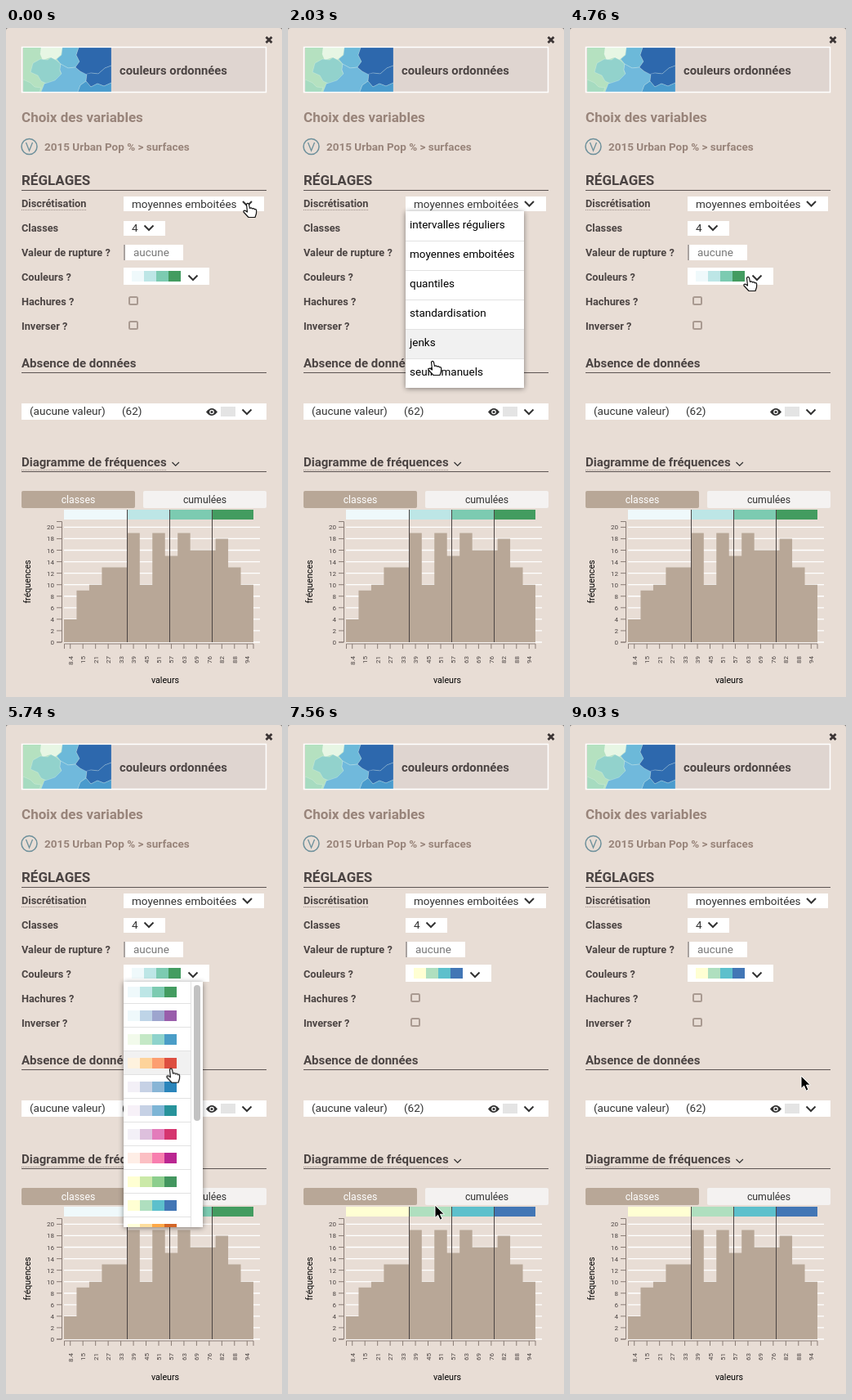
An HTML page for the animation above (9100 ms loop, 338 by 818 pixels).

```html
<!DOCTYPE html>
<html lang="fr">
<head>
<meta charset="utf-8">
<title>Couleurs ordonnées</title>
<style>
html, body { margin: 0; width: 100%; height: 100%; overflow: hidden; background: #e8ddd5; }
svg { display: block; width: 338px; height: 818px; font: 13.5px Roboto, sans-serif; fill: #333; }
.label { font-size: 12.75px; font-weight: 700; fill: #4b4443; }
.h1 { font-size: 17px; font-weight: 700; fill: #4b4443; }
.h2 { font-size: 15px; font-weight: 700; fill: #4b4443; }
.muted { font-weight: 700; fill: #98847a; }
.rule { stroke: #5c5352; }
.dots { stroke: #9b8e88; stroke-dasharray: 1 1; }
.box { fill: #fff; }
.chev { fill: none; stroke: #333; stroke-width: 2; }
.check { fill: none; stroke: #a99a91; stroke-width: 2; }
.tab { font-size: 12.3px; text-anchor: middle; }
.tick { font-size: 8px; fill: #4b4443; text-anchor: end; }
.axis { fill: none; stroke: #8a7d76; }
.title { font-size: 10.7px; fill: #000; text-anchor: middle; }
.menu { filter: drop-shadow(0 1px 3px rgba(0,0,0,.45)); }
.menu text { fill: #000; }
.sep { stroke: #e2e2e2; }
.hover { fill: #f1f1f1; }

.after, .menu, .hover, #hand, #arrow, #cursor { animation: 9100ms step-end infinite; }
.after { opacity: 0; animation-name: recolor; }
#methods { animation-name: methods; }
#palettes { animation-name: palettes; }
#methodHover { animation-name: methodHover; }
#paletteHover { animation-name: paletteHover; }
#hand { animation-name: hand; }
#arrow { animation-name: arrow; }
#cursor { animation-name: travel; animation-timing-function: ease-in-out; }

@keyframes recolor { 0% { opacity: 0 } 76.9%, 100% { opacity: 1 } }
@keyframes methods { 0% { opacity: 0 } 4.6% { opacity: 1 } 38.4%, 100% { opacity: 0 } }
@keyframes palettes { 0% { opacity: 0 } 54.6% { opacity: 1 } 76.9%, 100% { opacity: 0 } }
@keyframes hand { 0% { opacity: 1 } 41.5% { opacity: 0 } 50% { opacity: 1 } 76.9%, 100% { opacity: 0 } }
@keyframes arrow { 0% { opacity: 0 } 41.5% { opacity: 1 } 50% { opacity: 0 } 76.9%, 100% { opacity: 1 } }
@keyframes methodHover {
  0% { opacity: 0; transform: translateY(0) }
  7.25% { opacity: 1; transform: translateY(0); animation-timing-function: steps(5) }
  22.8% { opacity: 1; transform: translateY(180px) }
  27.3% { opacity: 1; transform: translateY(144px); animation-timing-function: steps(5) }
  35.9%, 100% { opacity: 0; transform: translateY(-36px) }
}
@keyframes paletteHover {
  0% { opacity: 0; transform: translateY(0) }
  55.92% { opacity: 1; transform: translateY(0); animation-timing-function: steps(9) }
  73.3%, 100% { opacity: 1; transform: translateY(261px) }
}
@keyframes travel {
  0%, 3.85% { transform: translate(296px, 214px) }
  7.7% { transform: translate(240px, 232px); animation-timing-function: linear }
  22.308% { transform: translate(177px, 407px) }
  26.9% { transform: translate(178px, 412px); animation-timing-function: linear }
  36.154%, 40% { transform: translate(288px, 221px) }
  52.308%, 55.4% { transform: translate(218px, 304px); animation-timing-function: linear }
  73.077% { transform: translate(181px, 570px) }
  75.4%, 83.08% { transform: translate(180px, 587px) }
  97.7%, 100% { transform: translate(283px, 429px) }
}
</style>
</head>
<body>
<svg viewBox="0 0 338 818">
  <path d="M0 3V0h3Q0 0 0 3M338 3V0h-3q3 0 3 3" fill="#777"/>
  <path d="M318.5 11l7 7m0-7l-7 7" stroke="#3c3535" stroke-width="2.8"/>

  <rect x="19.5" y="23.5" width="299" height="55" fill="#dfd5d0" stroke="#fff" stroke-width="1.5"/>
  <svg x="21" y="24" width="108" height="54" viewBox="0 0 108 54">
    <path d="M0 0h108v54H0z" fill="#b5e1c0"/>
    <g stroke="#fff" stroke-opacity=".35" stroke-width=".6">
      <path d="M22 0h26l-2 9-7 6-6-3-9 3-3-7z" fill="#e7f6e4"/>
      <path d="M12 19l9-5 9 1 4-3 6 3 6 5-1 8 3 6-9 8-8 3-9-4-4-7-9-4z" fill="#92d2cc"/>
      <path d="M48 0h20l-3 9 4 8-5 7-9 1-9-5-5-6 6-5z" fill="#6cb9d9"/>
      <path d="M46 20l9 5 9-1 6 5 8 3-1 9-7 5-3 8H22l4-10 4-1 9-3 8-8-2-5z" fill="#70b9dc"/>
      <path d="M68 0h40v22l-8 3-8 7-9-1-5 2-8-4-6-5 5-7-4-8z" fill="#2d68ad"/>
      <path d="M78 32l5-1 9 1 8-7 8-3v21l-9 4-8-3-8 4-6-7z" fill="#2f6cb0"/>
      <path d="M77 41l6 7 8-4 8 3 9-4v11H67l3-8z" fill="#4a9bcd"/>
      <path d="M0 39l9 4 5 5 8 1-2 5H0z" fill="#a6dbc0"/>
    </g>
  </svg>
  <text x="139" y="57" class="label" style="font-size:14.8px">couleurs ordonnées</text>

  <text x="19" y="115" class="muted" font-size="17">Choix des variables</text>
  <circle cx="28.5" cy="145" r="9.5" fill="none" stroke="#6d909b" stroke-width="1.5"/>
  <path d="M24.5 140l4 10 4-10" fill="none" stroke="#6d909b" stroke-width="1.3"/>
  <text x="47" y="150" class="muted">2015 Urban Pop % &gt; surfaces</text>

  <text x="19" y="192" class="h1">RÉGLAGES</text>
  <path d="M19 198.5h300M19 421.5h300M19 542.5h300" class="rule"/>
  <path d="M19 222.5h80M19 540.5h178" class="dots"/>
  <g id="labels" class="label"></g>

  <path class="box" d="M144 206h172v18H144zM144 236h51v18h-51zM144 265h73v19h-73zM144 293h105v21H144zM19 459h300v20H19z"/>
  <path d="M144 265h2v19h-2z" fill="#aaa3a0"/>
  <text x="154" y="220">moyennes emboitées</text>
  <text x="154" y="249">4</text>
  <text x="156" y="279" fill="#777">aucune</text>
  <path class="chev" d="M290 212l5.5 5.5 5.5-5.5M169.500 241.500l5.500 5.500 5.500-5.500M223.500 302.500l5.500 5.500 5.500-5.500M289.500 466.500l5.500 5.500 5.500-5.500"/>
  <rect class="check" x="151" y="329" width="10" height="9" rx="1.5"/>
  <rect class="check" x="151" y="359" width="10" height="9" rx="1.5"/>

  <text x="19" y="415" class="h2">Absence de données</text>
  <text x="29" y="473">(aucune valeur)</text>
  <text x="142" y="473">(62)</text>
  <path d="M245 469.500q7-9 14 0q-7 9-14 0z"/>
  <circle cx="252" cy="469.500" r="2.800" fill="#fff"/><circle cx="252" cy="469.500" r="1.600"/>
  <path d="M263 463h18v12h-18z" fill="#e4e4e4"/>

  <text x="19" y="536" class="h2">Diagramme de fréquences</text>
  <path class="chev" d="M203.500 531l4.200 4.200 4.200-4.200" style="stroke-width:1.300"/>
  <rect x="19" y="566" width="139" height="21" rx="2" fill="#b8a797"/>
  <rect x="168" y="566" width="151" height="21" rx="2" fill="#f4f2f1"/>
  <text x="88.500" y="581" class="tab" fill="#fff">classes</text>
  <text x="243.500" y="581" class="tab">cumulées</text>

  <g id="chart"></g>
  <text class="title" transform="translate(30 677) rotate(-90)">fréquences</text>
  <text class="title" x="195" y="801">valeurs</text>
  <g id="before"></g>
  <g id="after" class="after"></g>
  <path d="M148.500 589v162M200.500 589v162M252.500 589v162" stroke="#4b4443"/>

  <g id="methods" class="menu">
    <path class="box" d="M144 224h145v216H144z"/>
    <rect id="methodHover" class="hover" x="144" y="224" width="145" height="36"/>
    <g id="methodRows"></g>
  </g>
  <g id="palettes" class="menu">
    <path class="box" d="M144 314h97v300h-97z"/>
    <clipPath id="list"><path d="M144 314h97v300h-97z"/></clipPath>
    <g clip-path="url(#list)">
      <rect id="paletteHover" class="hover" x="144" y="312" width="82" height="29"/>
      <g id="paletteRows"></g>
    </g>
    <path d="M226.500 314v300" class="sep"/>
    <rect x="230" y="318" width="8" height="166" rx="4" fill="#c2c2c2"/>
  </g>

  <g id="cursor">
    <path id="hand" d="M-1.500 1.500Q0-.800 1.500 1.500L2.500 6.500Q4.500 5 5.500 7Q7.500 5.800 8.300 7.800Q10.500 7 10.700 9.500L10.500 13 9 17.500H1L-5 11Q-5.500 8.800-3 9.300L-.500 11z" fill="#fff" stroke="#111" stroke-width="1.200" stroke-linejoin="round"/>
    <path id="arrow" d="M0 0v15.500l3.600-3.300 2.600 6 2.800-1.200-2.600-5.800h5z" fill="#000" stroke="#fff" stroke-width="1"/>
  </g>
</svg>
<script>
const fill = (id, markup) => { document.getElementById(id).innerHTML = markup; };
const each = (list, draw) => list.map(draw).join('');

const methods = ['intervalles réguliers', 'moyennes emboitées', 'quantiles', 'standardisation', 'jenks', 'seuils manuels'];
const palettes = [
  'edf8fb b2e2e2 66c2a4 238b45', 'edf8fb b3cde3 8c96c6 88419d', 'f0f9e8 bae4bc 7bccc4 2b8cbe',
  'fef0d9 fdcc8a fc8d59 d7301f', 'f1eef6 bdc9e1 74a9cf 0570b0', 'f6eff7 bdc9e1 67a9cf 02818a',
  'f1eef6 d7b5d8 df65b0 ce1256', 'feebe2 fbb4b9 f768a1 ae017e', 'ffffcc c2e699 78c679 238443',
  'ffffcc a1dab4 41b6c4 225ea8', 'ffffd4 fed98e fe9929 cc4c02'
].map(p => p.split(' '));

// Colours sit on white at 85 %, between consecutive x edges.
const band = (palette, edges, y, h) =>
  `<rect x="${edges[0]}" y="${y}" width="${edges[4] - edges[0]}" height="${h}" fill="#fff"/>` +
  each(palette, (c, i) =>
    `<rect x="${edges[i]}" y="${y}" width="${edges[i + 1] - edges[i]}" height="${h}" fill="#${c}" fill-opacity=".85"/>`);
const swatch = (palette, x, y, h) => band(palette, [0, 15, 30, 45, 60].map(d => x + d), y, h);
const scheme = palette => swatch(palette, 154, 297, 13) + band(palette, [71, 148.5, 200.5, 252.5, 303], 589, 12);

fill('labels', each(['Discrétisation', 'Classes', 'Valeur de rupture ?', 'Couleurs ?', 'Hachures ?', 'Inverser ?'],
  (t, i) => `<text x="19" y="${219 + 30 * i}">${t}</text>`));
fill('before', scheme(palettes[0]));
fill('after', scheme(palettes[9]));
fill('methodRows', each(methods, (t, i) =>
  `<text x="149" y="${245 + 36 * i}">${t}</text>` +
  (i ? `<path class="sep" d="M144 ${224.5 + 36 * i}h145"/>` : '')));
fill('paletteRows', each(palettes, (p, i) =>
  swatch(p, 149, 320 + 29 * i, 13) + `<path class="sep" d="M144 ${340.5 + 29 * i}h82"/>`));

const counts = [4, 9, 10, 13, 13, 19, 10, 19, 15, 19, 16, 16, 18, 13, 10];
const values = [8.4, 15, 21, 27, 33, 39, 45, 51, 57, 63, 69, 76, 82, 88, 94];
const step = 232 / counts.length;
const yOf = n => 751 - 7.03 * n;
const levels = Array.from({ length: 11 }, (_, i) => 2 * i);

fill('chart',
  each(levels, n => `<path d="M71 ${yOf(n)}h240" stroke="#fff" stroke-width="1.3"/>`) +
  `<path fill="#b8a797" d="M71 751${each(counts, (n, i) => `V${yOf(n)}H${71 + step * (i + 1)}`)}V751z"/>` +
  '<path class="axis" d="M62 603.5h6.500V751h-6.500M71.500 759v-6H303v6"/>' +
  each(levels, n => `<path class="axis" d="M62 ${yOf(n)}h6"/><text class="tick" x="59" y="${yOf(n) + 3}">${n}</text>`) +
  each(values, (v, i) => {
    const x = 71 + step * (i + 0.5);
    return `<path class="axis" d="M${x} 753v6"/><text class="tick" transform="translate(${x + 3} 768) rotate(-90)">${v}</text>`;
  }));
</script>
</body>
</html>
```
